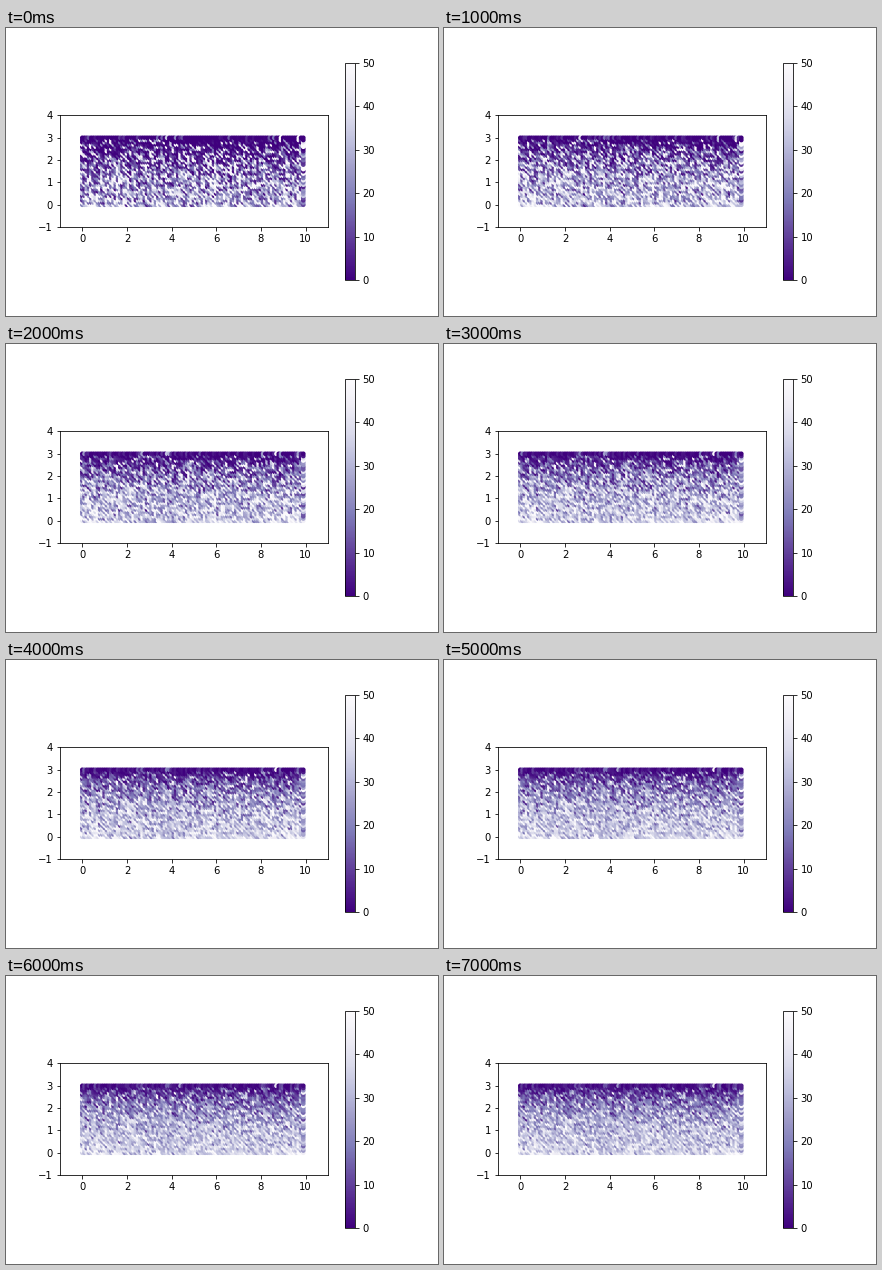
Recreate the animation shown at these times as a matplotlib script. Size 432 px wide and 288 px high, loop 8 s.

```python
import numpy as np
import matplotlib.pyplot as plt
from matplotlib.animation import FuncAnimation

FRAMES = 8
INTERVAL = 1000

plt.rcParams.update({
    "font.family": "DejaVu Sans",
    "font.size": 10,
    "figure.subplot.bottom": 0.125,
})

# Grid of points, drawn column by column from the bottom up
x, y = np.meshgrid(np.arange(100) / 10, np.arange(31) / 10, indexing="ij")
x, y = x.ravel(), y.ravel()

# Skewed samples: rare spikes near the top edge, steadier values further down
rng = np.random.default_rng(4)
depth = 3 - y
mean = 4 + 37 * (1 - np.exp(-depth / 1.3))
shape = 0.08 + 0.3 * depth + 0.17 * depth**2
samples = rng.gamma(shape, mean / shape, size=(FRAMES, x.size))

# Each frame shows the running average so far
averages = np.cumsum(samples, axis=0) / np.arange(1, FRAMES + 1)[:, None]

fig, ax = plt.subplots(figsize=(6, 4), dpi=72, facecolor="white")
dots = ax.scatter(x, y, s=10, c=averages[0], cmap="Purples_r",
                  vmin=0, vmax=50, linewidths=1.5, edgecolors="face")
ax.set_aspect("equal")
ax.set_xlim(-1, 11)
ax.set_ylim(-1, 4)
ax.set_xticks(range(0, 11, 2))
ax.set_yticks(range(-1, 5))
fig.colorbar(dots, ax=ax, ticks=range(0, 51, 10))


def update(frame):
    dots.set_array(averages[frame])
    return (dots,)


anim = FuncAnimation(fig, update, frames=FRAMES, interval=INTERVAL,
                     repeat=True, repeat_delay=0, blit=False)
plt.show()
```
